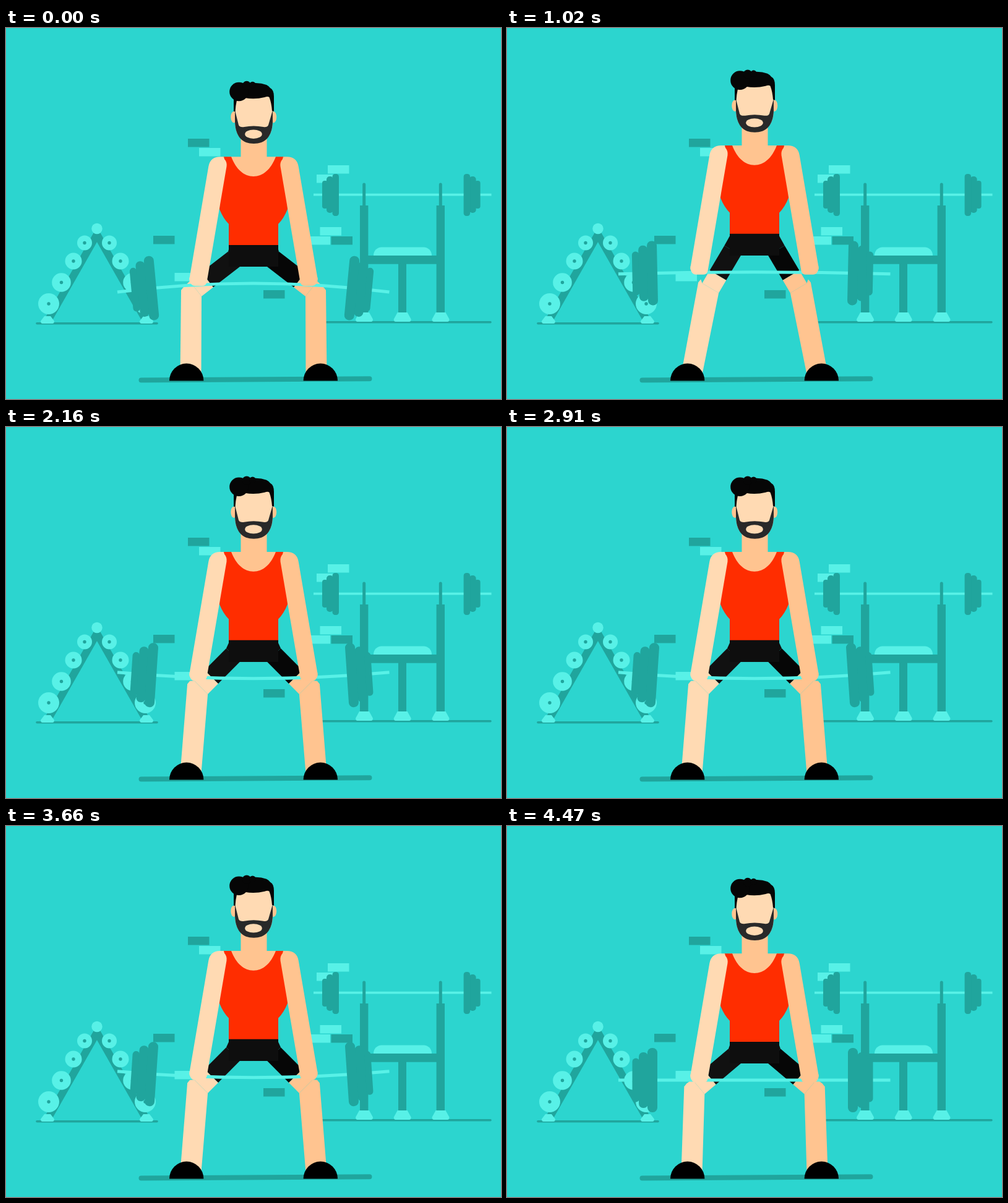
Recreate the animation shown at these times as an HTML page with a canvas. Size 800 by 600 pixels, loop 4.5 s.

```html
<!DOCTYPE html>
<html lang="en">
<head>
<meta charset="utf-8">
<title>Workout</title>
<style>
html, body { margin: 0; width: 100%; height: 100%; overflow: hidden; background: #2cd5cf; }
canvas { display: block; }
</style>
</head>
<body>
<canvas id="stage" width="800" height="600"></canvas>
<script>
const ctx = document.getElementById('stage').getContext('2d');
const BG = '#2cd5cf', DARK = '#20a59d', LIGHT = '#58f1e7';
const SKIN = '#ffdab3', SHADE = '#ffc490', RED = '#ff2d00';
const PERIOD = 750, STEP = 30;

// [phase in ms, value] keys, joined by a smooth periodic curve
const LIFT = [[0, 0], [45, -0.8], [105, 2], [180, 9], [255, 17], [330, 22.7],
  [375, 23], [450, 21.3], [570, 14], [660, 6.3], [720, 2]];
const BEND = [[0, 14], [60, 19], [180, 11], [300, 0], [390, -13], [480, -11],
  [570, -9], [660, -10], [720, 0]];

function sample(keys, phase) {
  const n = keys.length;
  const key = i => {
    const turn = Math.floor(i / n), [t, v] = keys[i - turn * n];
    return [t + turn * PERIOD, v];
  };
  let i = n - 1;
  while (keys[i][0] > phase) i--;
  const [a, b, c, d] = [key(i - 1), key(i), key(i + 1), key(i + 2)];
  const span = c[0] - b[0], u = (phase - b[0]) / span;
  const m1 = (c[1] - a[1]) / (c[0] - a[0]) * span;
  const m2 = (d[1] - b[1]) / (d[0] - b[0]) * span;
  const u2 = u * u, u3 = u2 * u;
  return (2 * u3 - 3 * u2 + 1) * b[1] + (u3 - 2 * u2 + u) * m1
    + (3 * u2 - 2 * u3) * c[1] + (u3 - u2) * m2;
}

function rect(x, y, w, h, color, r = 0) {
  ctx.fillStyle = color;
  ctx.beginPath();
  ctx.roundRect(x, y, w, h, r);
  ctx.fill();
}
function oval(x, y, rx, ry, color) {
  ctx.fillStyle = color;
  ctx.beginPath();
  ctx.ellipse(x, y, rx, ry, 0, 0, Math.PI * 2);
  ctx.fill();
}
const disc = (x, y, r, color) => oval(x, y, r, r, color);
function line(x1, y1, x2, y2, width, color, cap = 'round') {
  ctx.strokeStyle = color;
  ctx.lineWidth = width;
  ctx.lineCap = cap;
  ctx.beginPath();
  ctx.moveTo(x1, y1);
  ctx.lineTo(x2, y2);
  ctx.stroke();
}
function poly(points, color) {
  ctx.fillStyle = color;
  ctx.beginPath();
  points.forEach(p => ctx.lineTo(p[0], p[1]));
  ctx.closePath();
  ctx.fill();
}
function shape(d, color) {
  ctx.fillStyle = color;
  ctx.fill(new Path2D(d));
}
function mirrored(center, draw) {
  draw(false);
  ctx.save();
  ctx.translate(center * 2, 0);
  ctx.scale(-1, 1);
  draw(true);
  ctx.restore();
}
function stand(x, y, half, h) {
  shape(`M${x - half + 6} ${y} H${x + half - 6} L${x + half} ${y + h - 4}
    Q${x + half} ${y + h} ${x + half - 3} ${y + h} H${x - half + 3}
    Q${x - half} ${y + h} ${x - half} ${y + h - 4} Z`, LIGHT);
}

function drawBricks() {
  const brick = color => ([x, y]) => rect(x, y, 34.5, 13.5, color);
  [[294, 179], [525.5, 337], [238, 336], [416, 424]].forEach(brick(DARK));
  [[312, 194], [520, 222], [502, 237], [507.5, 322], [489.5, 337], [272.5, 396]].forEach(brick(LIGHT));
}

function drawRack() {
  line(50, 477.7, 244, 477.7, 3.6, DARK);
  mirrored(147, () => {
    line(147, 334, 69, 471, 12, DARK, 'butt');
    [[127, 347.5, 12], [109, 377, 13.5], [89.5, 411.5, 15.3], [69, 446, 17]].forEach(([x, y, r]) => {
      disc(x, y, r, LIGHT);
      disc(x, y, 2.7, DARK);
    });
    stand(67, 466, 11, 12);
  });
  poly([[147, 325], [138, 338], [147, 346], [156, 338]], DARK);
  disc(147, 324.5, 8.7, LIGHT);
}

function drawBench() {
  line(502, 475.7, 783, 475.7, 3.4, DARK);
  line(497, 269.7, 784.5, 269.7, 3.8, LIGHT, 'butt');
  mirrored(638.8, () => {
    rect(511, 247, 9, 45, DARK, 4);
    rect(518, 240, 11, 59, DARK, 5);
    rect(527.5, 236, 10.5, 68, DARK, 4.5);
  });
  [578.7, 702.3].forEach(x => {
    line(x, 253, x, 290, 5, DARK);
    rect(x - 6.7, 287, 13.4, 174, DARK);
  });
  rect(634, 380, 13, 81, DARK);
  rect(585, 368, 112, 13.7, DARK);
  rect(594, 354.5, 94, 13.5, LIGHT, [13, 13, 0, 0]);
  [579, 640.7, 702.5].forEach(x => stand(x, 460, 14, 15));
}

function drawLeg(lift, right) {
  const swing = 1.7 * lift - 0.015 * lift * lift;
  const hip = [378, 386 - lift], knee = [316 + swing, 434 - 0.3 * lift];
  const dx = hip[0] - knee[0], dy = hip[1] - knee[1], len = Math.hypot(dx, dy);
  const across = ([x, y]) => [x + dy / len * 31, y - dx / len * 31];
  const hem = [knee[0] + dx / len * 24, knee[1] + dy / len * 24];
  const skin = right ? SHADE : SKIN;
  const top = [knee[0] - 33, knee[1] - 13 - Math.max(0, Math.min(lift, 7))];
  poly([hem, knee, across(knee), across(hem)], skin);
  poly([knee, [315.5, 560], [281.5, 560], [top[0], top[1] + 3], [top[0] + 4, top[1] - 2], across(knee)], skin);
  poly([hip, hem, across(hem), across(hip)], right ? '#060606' : '#111');
  poly([hip, across(hip), [362, 351 - lift], [400, 386 - lift]], '#0e0e0e');
  shape('M264 570.5 A27.7 28 0 0 1 319.4 570.5 Z', '#000');
}

function drawBarbell(y, bend, reach) {
  ctx.strokeStyle = LIGHT;
  ctx.lineWidth = 5;
  ctx.lineCap = 'butt';
  ctx.beginPath();
  ctx.moveTo(180 - reach, y + bend);
  ctx.quadraticCurveTo(400, y - bend, 619.5, y + bend);
  ctx.stroke();
  const at = 163 / 220;
  mirrored(397, () => {
    ctx.save();
    ctx.translate(235, y + bend * at * at);
    ctx.rotate(-2 * bend * at / 220);
    rect(-32.5, -35.5, 11.5, 71, DARK, 5.7);
    rect(-22, -45, 15, 90, DARK, 7);
    rect(-8, -52, 16, 104, DARK, 7.5);
    ctx.restore();
  });
}

function drawTorso() {
  rect(379.5, 165, 42, 50, SHADE);
  rect(358, 208.3, 84, 38, SHADE);
  rect(360, 350, 80, 36, '#0e0e0e');
  shape(`M350 208.3 H364 C372 229 385 240 400 240 C415 240 428 229 436 208.3 H450
    L455 293 Q449 308 440 317 V351 H360 V317 Q351 308 345 293 Z`, RED);
  mirrored(400, right => shape(`M352 208.3 H346 Q330 208.3 327.3 224 L297 402
    Q295 407 298 412 Q300 417 306 417 H317 Q323 417 324.5 411
    L356.5 224 Q357.5 217 353 212 Z`, right ? SHADE : SKIN));
}

function drawHead() {
  oval(368.3, 144, 5, 9.3, SHADE);
  oval(432.2, 144, 5, 9.3, SHADE);
  shape('M370 108 H431 V152 Q430 186 400.5 186 Q371 186 370 152 Z', SKIN);
  shape(`M370 133 V152 C371 176 382 187 400.5 187 C419 187 430 176 431 152 V133
    L424 157 Q422 161 416 160 Q400 157 385 160 Q378 161 376 157 Z`, '#292929');
  oval(400, 171.7, 13.8, 7.2, SKIN);
  shape(`M368 135 V108 L384 92 Q405 86 421 92 Q425 94 427 97 Q433 100 433 111 V135 L430 134
    Q429 121 425.5 112 Q423 110 418 112 Q402 116 386 113 L373 117 Q371 126 370.5 135 Z`, '#060606');
  disc(376.5, 103, 15.3, '#060606');
  disc(389, 93, 7.2, '#060606');
  disc(398.5, 92, 5.3, '#060606');
}

function draw(time) {
  const phase = Math.floor(time % PERIOD / STEP) * STEP;
  const lift = sample(LIFT, phase), bend = sample(BEND, phase);
  const reach = 5 * Math.exp(-(((phase - 450) / 60) ** 2));
  rect(0, 0, 800, 600, BG);
  drawBricks();
  drawRack();
  drawBench();
  line(218.5, 569.5, 587.5, 567.3, 8, DARK);
  mirrored(400, right => drawLeg(lift, right));
  ctx.save();
  ctx.translate(0, -lift);
  rect(360, 350, 80, 36, '#0e0e0e');
  drawBarbell(413, bend, reach);
  drawTorso();
  drawHead();
  ctx.restore();
}

let start;
function tick(now) {
  start ??= now;
  draw(now - start);
  requestAnimationFrame(tick);
}
draw(0);
requestAnimationFrame(tick);
</script>
</body>
</html>
```
